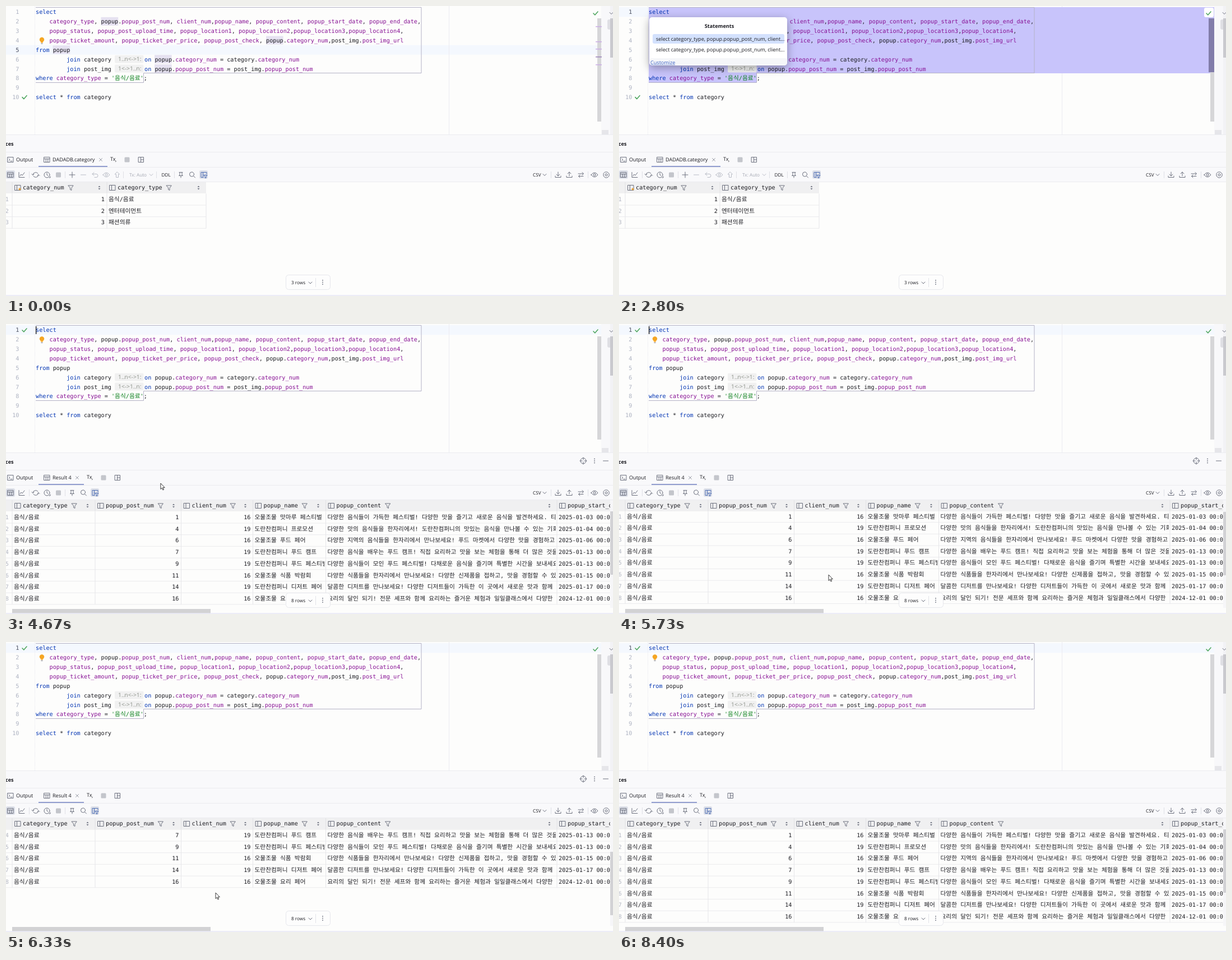
Recreate the animation shown at these times as an HTML page. Size 1083x517 px, loop 8.43 s.

```html
<!DOCTYPE html>
<html lang="ko">
<head>
<meta charset="utf-8">
<style>
html, body { margin: 0; width: 100%; height: 100%; overflow: hidden; background: #fdfdfc }
svg { display: block }
text { white-space: pre; font: 9.1px "Open Sans", "Noto Sans", sans-serif; fill: #1c1c22; text-rendering: geometricPrecision }
.m { font: 10.2px "DejaVu Sans Mono", "Noto Sans Mono", monospace }
.k { font: 10.7px "Noto Sans CJK KR", "Noto Sans CJK", sans-serif }
.b { font-weight: 700 }
.e { text-anchor: end }
.c { text-anchor: middle }
.s { font-size: 8.2px }
.h { font-size: 10.3px }
.ic { fill: none; stroke-width: 1; stroke-linecap: round; stroke-linejoin: round }
</style>
</head>
<body>
<svg id="stage" width="1083" height="517" viewBox="0 0 1083 517"></svg>
<script>
const CH = 6.136, LINE = 16.85, ROW = 20.7, TOP = 334.3;
const KEY = '#0033b3', COL = '#871094', STR = '#067d17', GREY = '#6c707e', PALE = '#b9bcc6';

const rect = (x, y, w, h, fill, more = '') => `<rect x="${x}" y="${y}" width="${w}" height="${h}" fill="${fill}" ${more}/>`;
const path = (d, stroke, more = '') => `<path d="${d}" fill="none" stroke="${stroke}" ${more}/>`;
const text = (x, y, s, cls = '', fill = '') => `<text x="${x}" y="${y + 3.4}" class="${cls}" ${fill && `style="fill:${fill}"`}>${s}</text>`;
const hangul = s => String(s).replace(/[가-힣]+/g, m => `<tspan class="k">${m}</tspan>`);
const mono = (x, y, s, cls = '', fill = '') => text(x, y, hangul(s), 'm ' + cls, fill);
const group = (id, s) => `<g id="${id}">${s}</g>`;
const lineY = i => 11 + LINE * i;

// Icons, drawn around 0,0
const shapes = {
  table: 'M-5-4.5H5V4.5H-5ZM-5-1.5H5M-1.7-1.5V4.5M1.7-1.5V4.5',
  column: 'M-5-4.5H5V4.5H-5ZM-1.5-4.5V4.5',
  layout: 'M-4.5-4.5H4.5V4.5H-4.5ZM-.5-4.5V4.5M-.5 0H4.5',
  output: 'M-5-4.5H5V4.5H-5ZM-3-2L-1 0L-3 2M0 2.5H3',
  chart: 'M-5-4.5V4.5H5M-3 2L-1-1L1 1L5-4',
  refresh: 'M-5 0A5 4.5 0 0 1 4-2.5M5 0A5 4.5 0 0 1-4 2.5M-7-1.5L-5 .5L-3-1.5M7 1.5L5-.5L3 1.5',
  clock: 'M5 0A5 5 0 1 1-5 0A5 5 0 1 1 5 0M0-3V0L2 1.5M4 5H6V3',
  plus: 'M-5 0H5M0-5V5',
  minus: 'M-4.5 0H4.5',
  undo: 'M-2-4.5L-5-1.5L-2 1.5M-5-1.5H2A3 3 0 0 1 2 4.5H-1',
  eye: 'M-6 0Q0-8 6 0Q0 8-6 0ZM2 0A2 2 0 1 1-2 0A2 2 0 1 1 2 0',
  up: 'M0-5L4-1H2V4.5H-2V-1H-4Z',
  pin: 'M-3-4.5H3M-2-4.5V0L-3.5 1.5H3.5L2 0V-4.5M0 1.5V5',
  search: 'M3-1A4 4 0 1 1-5-1A4 4 0 1 1 3-1M2 2L5 5',
  toggle: 'M5-1.5V-4.5H-5V4.5H-1M-1.5-4.5V4M0 .5H6L4 3V5.5H2V3Z',
  funnel: 'M-4.5-4H4.5L1.2 .5V4.5L-1.2 3.2V.5Z',
  chevron: 'M-3-1.5L0 1.5L3-1.5',
  close: 'M-2.5-2.5L2.5 2.5M2.5-2.5L-2.5 2.5',
  load: 'M0-5V2M-3-1L0 2L3-1M-5 2V4.5H5V2',
  save: 'M0 2V-5M-3-2L0-5L3-2M-5 2V4.5H5V2',
  swap: 'M-5-2H4M2-4.5L4.5-2L2 .5M4 2.5H-4M-2 0L-4.5 2.5L-2 5',
  gear: 'M-2-5H2L5-2V2L2 5H-2L-5 2V-2ZM2 0A2 2 0 1 1-2 0A2 2 0 1 1 2 0',
  aim: 'M5 0A5 5 0 1 1-5 0A5 5 0 1 1 5 0M0-6V-2M0 2V6M-6 0H-2M2 0H6',
  check: 'M-4 0L-1.2 3L4-3'
};
const icon = (name, x, y, color = GREY, more = '') =>
  `<path class="ic" d="${shapes[name]}" transform="translate(${x} ${y})" stroke="${color}" ${more}/>`;
const dots = (x, y) => [-3.5, 0, 3.5].map(d => `<circle cx="${x}" cy="${y + d}" r=".9" fill="${GREY}"/>`).join('');
const sorter = (x, y) => `<path d="M${x - 2} ${y - 1}l2-2.5l2 2.5zM${x - 2} ${y + 1}l2 2.5l2-2.5z" fill="${GREY}"/>`;

// Editor
const sql = [
  'select',
  '    category_type, popup.popup_post_num, client_num,popup_name, popup_content, popup_start_date, popup_end_date,',
  '    popup_status, popup_post_upload_time, popup_location1, popup_location2,popup_location3,popup_location4,',
  '    popup_ticket_amount, popup_ticket_per_price, popup_post_check, popup.category_num,post_img.post_img_url',
  'from popup',
  '         join category |on popup.category_num = category.category_num',
  '         join post_img |on popup.popup_post_num = post_img.popup_post_num',
  "where category_type = '음식/음료';",
  '',
  'select * from category'
];
const hints = { 5: '1..n&lt;-&gt;1:', 6: '1&lt;-&gt;1..n:' };
const paint = s => s.replace(/'[^']*'|[a-z]\w*/g, w => {
  const color = w[0] == "'" ? STR : /^(select|from|join|on|where)$/.test(w) ? KEY
    : /^(popup|category|post_img)$/.test(w) ? '' : COL;
  return color ? `<tspan style="fill:${color}">${w}</tspan>` : w;
});
const codeLine = (s, i) => {
  const [a, b] = s.split('|'), y = lineY(i);
  return mono(53, y, paint(a)) + (b ? rect(194, y - 7.5, 51.5, 14, '#f1f1f1', 'rx="2"')
    + text(200, y - .3, hints[i], 'h', '#8b9088') + mono(247, y, paint(b)) : '');
};
const numbers = sql.map((_, i) => mono(23.5, lineY(i), i + 1, 'e', '#aeb3c2')).join('');
const uses = [[169.5, 1], [464, 3], [83.5, 4], [265, 5], [265, 6]]
  .map(([x, i]) => rect(x, lineY(i) - 8, 5 * CH, 15, '#e6e2f1')).join('');

const editor =
  rect(0, 0, 1083, 229, '#fdfdfc')
  + rect(0, 2, 1062, 17, '#f4f8fe', 'id="rowMark"')
  + group('uses', uses)
  + path('M51.5 0V229', '#e9e9ee', 'stroke-dasharray="1 1"') + path('M790.5 0V229', '#ececf2')
  + group('selection', rect(53, 2, 1009, 118, '#c8c4fb') + rect(53, 120, 193, 16.5, '#c8c4fb'))
  + path('M53 2.5H741V119.5H245.5V136.5H53', '#b4b2c6')
  + numbers + group('lineNo', mono(23.5, 0, '', 'e', '#5c6070'))
  + sql.map(codeLine).join('')
  + rect(53, 4, 1.3, 14, '#111', 'id="caret"')
  + group('bulb', '<circle cx="64" cy="-1.5" r="4.2" fill="#f5a623"/>' + rect(62, 2.5, 4, 1.5, '#f5a623') + rect(62.5, 5, 3, 1, GREY))
  + group('done', icon('check', 33, 0, '#4fa65f', 'style="stroke-width:1.6"'))
  + rect(1062, 0, 16, 229, '#f8f8fa') + rect(1055, 22, 7, 184, '#d6d6d8')
  + rect(1063, 221, 12, 8, '#e6e6ea') + rect(1078, 0, 5, 229, '#f2f2f5') + rect(1073, 24, 10, 18, '#dfdfe4', 'rx="3"')
  + rect(1078, 22, 5, 70, '#c9c9ce') + icon('chevron', 1080, 13)
  + group('stripes', [37, 64, 77, 91, 105].map((y, i) => rect(1052, y - 1, 11, 1.5, i == 3 ? '#9d86bb' : '#cbaee6')).join(''))
  + group('selStripe', rect(1052, 22, 10, 96, '#827daa') + rect(1044, 3, 17, 17, '#fff', 'rx="3"'))
  + icon('check', 1052, 13, '#4fa65f', 'style="stroke-width:1.6"');

// Tool window
const tabs = (name, right, d) =>
  text(83, 274, name) + icon('table', 73, 274) + icon('close', right - 12, 274, '#9a9da8')
  + path(`M58 286H${right}`, '#929dcf', 'stroke-width="2"')
  + text(186 + d, 273, 'Tx') + text(195 + d, 274, ',')
  + rect(211.5 + d, 269.5, 9, 9, '#c3c5cb', 'rx="1.5"') + icon('layout', 241 + d, 274);
const tail = d => rect(345 + d, 293, 15, 15, '#dcdfe8', 'rx="3"')
  + icon('pin', 312 + d, 301) + icon('search', 332.5 + d, 301) + icon('toggle', 353 + d, 301, '#4f6fb5');
const rule = x => path(`M${x}.5 295V307`, '#dfe0e6');

const panel =
  rect(0, 229, 1083, 288, '#fdfdfc') + rect(0, 229, 1083, 85, '#f9f9fb')
  + path('M0 229.5H1083M0 260.5H1083M0 287.5H1083M0 313.5H1083', '#ebecf0')
  + text(-1, 246, 'ces', 'b')
  + group('panelIcons', icon('aim', 1030, 244) + dots(1050, 244) + icon('minus', 1070, 244))
  + icon('output', 8, 274) + text(18, 274, 'Output')
  + rect(0, 293, 16, 15, '#dcdfe8', 'rx="3"') + icon('table', 8, 301) + icon('chart', 28, 301) + rule(41)
  + icon('refresh', 53, 301) + icon('clock', 73, 301) + rect(89, 296.5, 9, 9, '#c3c5cb', 'rx="1.5"') + rule(105)
  + text(940, 301, 'CSV', 's') + icon('chevron', 961, 301) + rule(972)
  + icon('load', 985, 301) + icon('save', 1005, 301) + icon('swap', 1026, 301) + rule(1038)
  + icon('eye', 1050, 301) + icon('gear', 1071, 301);

// Data grid: numbers are right-aligned, text is clipped to its column
function grid(id, edges, heads, rows) {
  const width = Math.min(edges.at(-1), 1078), cols = heads.map((_, c) => [edges[c], edges[c + 1]]);
  const head = rect(0, 314, width, 20, '#f0f0f1') + cols.map(([x, r], c) =>
    icon('column', x + 10, 324) + mono(x + 19, 324, heads[c])
    + icon('funnel', x + 31 + heads[c].length * CH, 324) + sorter(r - 13.5, 324)
    + path(`M${x} 314V334`, '#e2e2e5')).join('');
  const body = rows.map((row, i) => {
    const y = ROW * (i + .5);
    return mono(5, y, i + 1, 'e', '#b4b7c2') + row.map((v, c) => {
      const [x, r] = cols[c];
      return typeof v == 'number' ? mono(r - 4, y, v, 'e')
        : `<svg x="${x}" y="${y - 10}" width="${r - x - 2}" height="20">${mono(3, 10, v)}</svg>`;
    }).join('') + path(`M0 ${ROW * (i + 1)}H${width}`, '#ebebed');
  }).join('') + edges.map(x => path(`M${x} 0V${ROW * rows.length}`, '#e6e6e9')).join('');
  return head + `<svg y="${TOP}" width="1078" height="172"><g id="${id}">${body}</g></svg>`;
}

const food = '음식/음료', brandA = '오물조물', brandB = '도란찬컴퍼니';
const events = [
  [1, brandA + ' 맛마루 페스티벌', '다양한 음식들이 가득한 페스티벌! 다양한 맛을 즐기고 새로운 음식을 발견하세요. 티켓', '2025-01-03'],
  [4, brandB + ' 프로모션', `다양한 맛의 음식들을 한자리에서! ${brandB}의 맛있는 음식을 만나볼 수 있는 기회`, '2025-01-04'],
  [6, brandA + ' 푸드 페어', '다양한 지역의 음식들을 한자리에서 만나보세요! 푸드 마켓에서 다양한 맛을 경험하고', '2025-01-06'],
  [7, brandB + ' 푸드 캠프', '다양한 음식을 배우는 푸드 캠프! 직접 요리하고 맛을 보는 체험을 통해 더 많은 것을', '2025-01-13'],
  [9, brandB + ' 푸드 페스티벌', '다양한 음식들이 모인 푸드 페스티벌! 다채로운 음식을 즐기며 특별한 시간을 보내세요', '2025-01-13'],
  [11, brandA + ' 식품 박람회', '다양한 식품들을 한자리에서 만나보세요! 다양한 신제품을 접하고, 맛을 경험할 수 있는', '2025-01-15'],
  [14, brandB + ' 디저트 페어', '달콤한 디저트를 만나보세요! 다양한 디저트들이 가득한 이 곳에서 새로운 맛과 함께', '2025-01-17'],
  [16, brandA + ' 요리 페어', '요리의 달인 되기! 전문 셰프와 함께 요리하는 즐거운 체험과 일일클래스에서 다양한', '2024-12-01']
].map(([n, name, about, day]) => [food, n, name.startsWith(brandA) ? 16 : 19, name, about, day + ' 00:00:00']);

const before = tabs('DADADB.category', 181, 0) + tail(0)
  + icon('plus', 118, 301) + icon('minus', 138, 301, PALE) + icon('undo', 159, 301, PALE) + icon('eye', 179, 301, PALE)
  + icon('up', 198.5, 301, PALE) + rule(209) + text(220, 301, 'Tx: Auto', 's', '#a4a7b2')
  + icon('chevron', 259, 301, PALE) + rule(268) + text(277.5, 301, 'DDL', 's') + rule(300)
  + grid('list', [11, 180, 357], ['category_num', 'category_type'], [[1, food], [2, '엔터테이먼트'], [3, '패션의류']])
  + '<circle cx="24.5" cy="326.5" r="2" fill="#e8a33d"/>';
const after = tabs('Result 4', 139, -42) + tail(-194)
  + grid('rows', [11, 159, 312.5, 440.5, 570.5, 983, 1140],
    ['category_type', 'popup_post_num', 'client_num', 'popup_name', 'popup_content', 'popup_start_date'], events)
  + rect(1078, 314, 5, 192, '#f6f6f8') + rect(1078, 334, 5, 113, '#d2d2d5', 'id="thumb"')
  + rect(11, 508, 354, 7.5, '#d2d2d4');
const pill = rect(499.5, 479.5, 79, 26, '#fdfdfd', 'rx="5" stroke="#e6e7ec"')
  + icon('chevron', 543, 493.5) + path('M552.5 485V501', '#e2e3e8') + dots(565, 492.5)
  + group('count', text(509, 493, '', 's'));

// Statement chooser
const choice = 'select category_type, popup.popup_post_num, client...';
const chooser = rect(54, 20, 246, 86, '#fff', 'rx="5" style="filter:drop-shadow(0 4px 8px #0005)"')
  + rect(54.5, 93, 245, 12.5, '#f5f6f9', 'rx="4"')
  + text(179, 36, 'Statements', 'b c') + rect(60, 50, 235, 17, '#d3e1fd', 'rx="3"')
  + text(66, 59, choice) + text(66, 78, choice)
  + text(56, 100.5, 'Customize', '', '#3b62c4') + path('M56 105H100', '#8aa3dc', 'stroke-width=".7"');

const pointers =
  '<path id="arrow" d="M0 0V10.5L2.4 8.3L4 12L5.6 11.3L4 7.7H7.3Z" fill="#fff" stroke="#222" stroke-width=".9"/>'
  + '<path id="hand" d="M-1 1Q0-1 1 1V5L5 6Q6 6 6 8L5 13H-1L-4 8Q-4 6-1 8Z" fill="#fff" stroke="#222" stroke-width=".9"/>';

const $ = id => document.getElementById(id);
$('stage').innerHTML = editor + panel + group('before', before) + group('after', after) + pill
  + path('M0 516H1083', '#dcdcf2') + group('chooser', chooser) + pointers;

// Motion
const LOOP = 8430, CLICK = 1655, OPEN = 2700, RUN = 4200, DONE = 4250;
const mousePath = [[1655, 53, 11], [1950, 0, -25], [2700, 90, -20], [3500, 140, 58], [4200, 140, 58],
  [5050, 374, 447], [6800, 374, 447], [7070, 381, 326], [7600, 400, 200]];
const scrollPath = [[5705, 0], [6000, 62.1], [6550, 62.1], [6850, 0]];

function at(keys, t, c) {
  if (t <= keys[0][0]) return keys[0][c];
  const i = keys.findIndex(k => k[0] > t);
  if (i < 0) return keys.at(-1)[c];
  const a = keys[i - 1], b = keys[i], u = (t - a[0]) / (b[0] - a[0]);
  return a[c] + (b[c] - a[c]) * u * u * (3 - 2 * u);
}
const show = (id, on) => $(id).style.display = on ? '' : 'none';
const move = (id, x, y) => $(id).setAttribute('transform', `translate(${x} ${y})`);

function draw(t) {
  const start = t < CLICK, open = t >= OPEN && t < RUN, done = t >= DONE;
  const line = start ? 4 : 0, x = at(mousePath, t, 1), y = at(mousePath, t, 2), scroll = at(scrollPath, t, 1);
  $('rowMark').setAttribute('y', lineY(line) - 8.7);
  $('lineNo').firstChild.textContent = line + 1;
  move('lineNo', 0, lineY(line));
  show('uses', start);
  show('stripes', start);
  $('caret').setAttribute('x', start ? 114 : 53);
  $('caret').setAttribute('y', lineY(line) - 7);
  show('caret', !open && (start ? t % 1000 >= 500 : (t - CLICK) % 1000 < 500));
  show('bulb', start || t >= OPEN);
  move('bulb', 0, lineY(start ? 3 : 1));
  move('done', 0, lineY(done ? 0 : 9));
  for (const id of ['selection', 'selStripe', 'chooser']) show(id, open);
  show('after', done);
  show('before', !done);
  $('count').firstChild.textContent = (done ? 8 : 3) + ' rows';
  show('panelIcons', y > 229);
  move('rows', 0, -scroll);
  $('thumb').setAttribute('y', 334 + scroll * .645);
  show('hand', open && y > 18);
  show('arrow', y > 229 || (!start && t < 2000 && x < 50));
  move('hand', x, y);
  move('arrow', x, y);
}
function tick(now) {
  draw(now % LOOP);
  requestAnimationFrame(tick);
}
draw(0);
requestAnimationFrame(tick);
</script>
</body>
</html>
```
